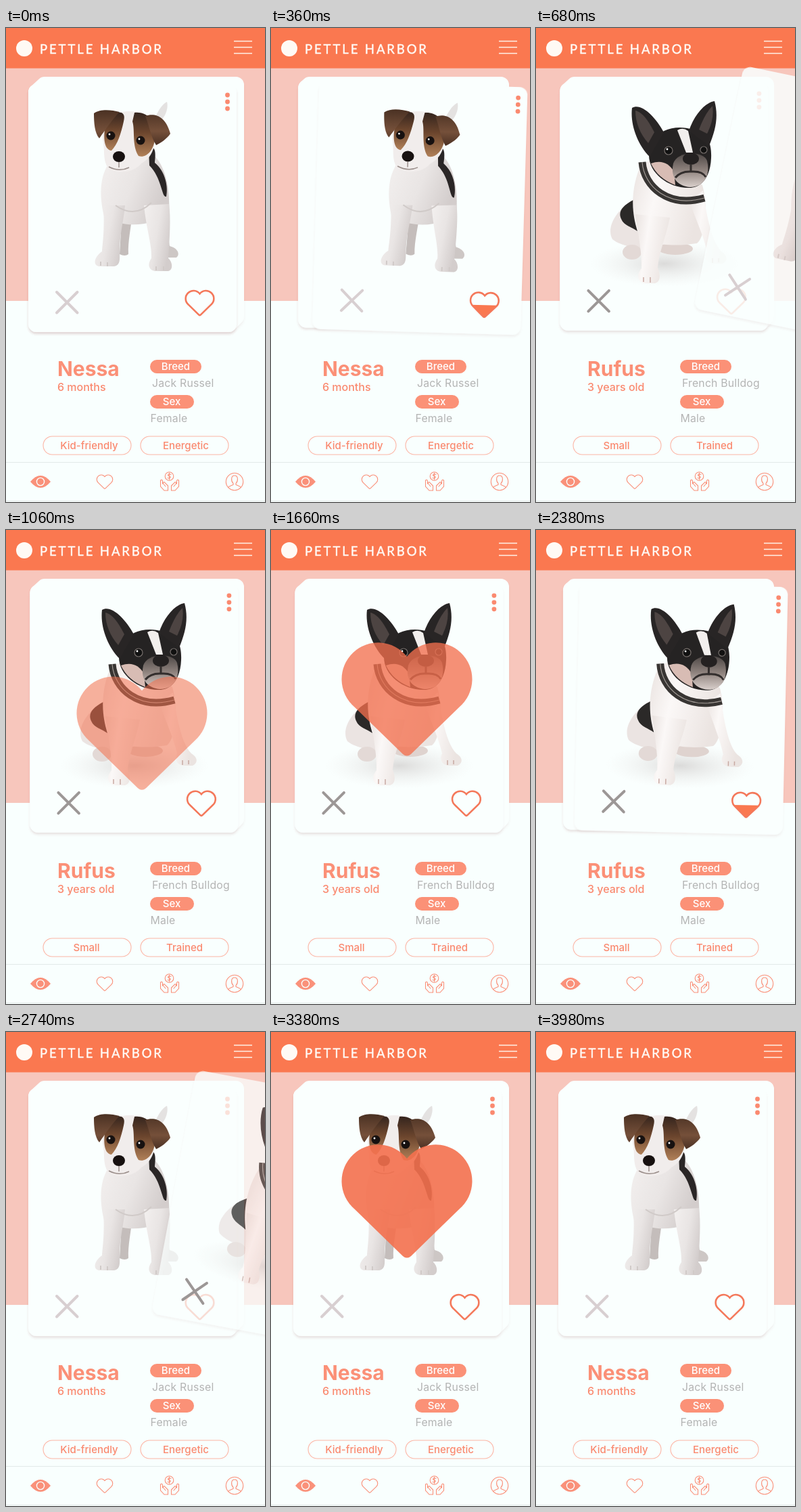
Animation, 383 px wide and 700 px high, one loop 4180 ms. Source, as an HTML page:

```html
<!DOCTYPE html>
<html lang="en">
<head>
<meta charset="utf-8">
<title>Pet cards</title>
<style>
html, body { margin: 0; height: 100%; overflow: hidden; background: #f9fffe; }
svg { display: block; width: 383px; height: 700px; font-family: Inter, "Open Sans", sans-serif; }
.title { font: 18.5px Lato, sans-serif; letter-spacing: 2.9px; fill: #fffaf5; stroke: #fffaf5; stroke-width: .45; }
.name { font-size: 30px; font-weight: 700; fill: #fb9077; }
.age { font-size: 16px; font-weight: 500; fill: #fa896f; }
.tag { font-size: 15px; font-weight: 500; fill: #fa896f; text-anchor: middle; }
.tag.pill { fill: #fff; }
.fact { font-size: 15.8px; letter-spacing: .2px; fill: #b4b4b4; }
.line { fill: none; stroke: #fa8f78; stroke-width: 1.1; stroke-linecap: round; }
.line.frame { stroke: #fcb5a5; }
</style>
</head>
<body>
<svg viewBox="0 0 383 700">
  <defs>
    <path id="heart" d="M0-65A54 54 0 1 0-78 9L-6 79Q0 84 6 79L78 9A54 54 0 1 0 0-65Z"/>
    <clipPath id="inHeart"><use href="#heart"/></clipPath>
    <linearGradient id="fur" x2="1" y2=".4">
      <stop stop-color="#f3f0ef"/><stop offset=".55" stop-color="#e9e5e4"/><stop offset="1" stop-color="#d3cdcc"/>
    </linearGradient>
    <linearGradient id="coat" x2="1" y2=".3">
      <stop stop-color="#e9e2df"/><stop offset=".4" stop-color="#fbf8f7"/><stop offset="1" stop-color="#ebe4e1"/>
    </linearGradient>
    <linearGradient id="tan" x2="0" y2="1">
      <stop stop-color="#35251e"/><stop offset=".45" stop-color="#6b452d"/><stop offset="1" stop-color="#b08058"/>
    </linearGradient>
    <linearGradient id="ear" x2="0" y2="1">
      <stop stop-color="#4a3123"/><stop offset=".6" stop-color="#75503a"/><stop offset="1" stop-color="#4a3023"/>
    </linearGradient>
    <linearGradient id="muzzle" x2="0" y2="1">
      <stop stop-color="#4d4745"/><stop offset=".5" stop-color="#8f837e"/><stop offset="1" stop-color="#d9cfcb"/>
    </linearGradient>
    <radialGradient id="ground">
      <stop stop-color="#b5aead" stop-opacity=".45"/><stop offset="1" stop-color="#e2dcdb" stop-opacity="0"/>
    </radialGradient>
    <filter id="soft" x="-10%" y="-10%" width="120%" height="120%">
      <feDropShadow dx="0" dy="3" stdDeviation="1.5" flood-color="#a06a68" flood-opacity=".09"/>
    </filter>

    <g id="terrier">
      <path fill="#e4e2e1" d="M214 136C224 133 224 117 238 109C241 120 234 136 222 142Z"/>
      <path fill="#cdc7c5" d="M222 270C240 285 240 310 242 322C254 325 258 334 252 339H236L226 300Z"/>
      <path fill="#c4bdbb" d="M170 265L187 272C185 295 180 315 181 334Q176 338 168 334L170 300Z"/>
      <path fill="url(#fur)" d="M152 200C138 220 138 250 145 278C170 296 215 294 241 274C243 240 236 200 215 185Z"/>
      <path fill="#2a2626" d="M211 178C223 171 221 190 220 199C236 212 240 235 237 249C230 251 231 222 212 203Z"/>
      <path fill="url(#fur)" d="M144 262C146 300 143 315 142 330C130 338 128 351 138 352H160C170 350 168 340 168 330C168 305 174 285 176 262Z"/>
      <path fill="url(#fur)" d="M204 262C208 300 216 320 215 340C208 350 212 359 222 359H240C248 357 246 345 240 340C242 310 244 280 241 260Z"/>
      <path fill="none" stroke="#d0cac8" stroke-width="2" d="M162 262Q190 282 215 258M140 345V351M150 346V352M222 352V358M233 352V358"/>
      <path fill="#f1edec" d="M160 128C180 118 210 124 218 140C224 165 220 190 200 200C190 213 165 217 152 208C142 195 147 180 143 165C142 148 148 136 160 128Z"/>
      <path fill="url(#tan)" d="M158 126C172 122 177 126 174 138C170 156 165 172 156 181C146 180 144 165 146 150Z"/>
      <path fill="url(#tan)" d="M190 125C212 123 222 140 220 165C218 182 206 193 196 189C186 174 191 150 187 138Z"/>
      <path fill="url(#ear)" d="M130 126C140 119 156 121 168 124C158 134 150 146 138 163C131 155 130 140 130 126ZM206 130C220 125 236 130 243 156C238 164 228 170 222 173C214 160 212 145 206 130Z"/>
      <g fill="#171110"><circle cx="155" cy="159" r="6.5"/><circle cx="199" cy="166" r="6.5"/><ellipse cx="167" cy="190" rx="9" ry="8"/></g>
      <path fill="none" stroke="#9a8e8a" stroke-width="1.5" d="M152 205Q168 213 182 206M167 198V206"/>
      <g fill="#fff"><circle cx="153" cy="157" r="1.4"/><circle cx="197" cy="164" r="1.4"/></g>
    </g>

    <g id="bulldog">
      <ellipse cx="190" cy="348" rx="110" ry="34" fill="url(#ground)"/>
      <path fill="#ebe4e2" d="M146 252C116 270 104 296 113 312C128 324 150 322 160 332V270Z"/>
      <path fill="#2b2928" d="M146 253C127 262 121 272 126 282C130 292 142 294 150 300Z"/>
      <ellipse cx="142" cy="331" rx="14" ry="11" fill="#e3d9d6"/>
      <ellipse cx="206" cy="326" rx="26" ry="9" fill="#dfd3cf"/>
      <path fill="url(#coat)" d="M156 200C138 240 142 275 150 300C160 320 200 324 238 318C252 306 254 260 246 232L190 190Z"/>
      <path fill="url(#coat)" d="M147 275C152 310 157 335 156 355C148 364 150 376 162 377H176C186 374 183 362 180 354C182 330 192 310 198 280Z"/>
      <path fill="url(#coat)" d="M226 255C240 290 250 315 253 330C248 342 255 348 265 348H276C284 344 284 336 274 330C262 318 254 290 247 240Z"/>
      <path fill="none" stroke="#c8a9a2" stroke-width="1.5" d="M159 368V375M169 368V376M261 340V347M270 340V346"/>
      <path fill="none" stroke="#383533" stroke-width="11" d="M157 198C160 235 196 266 249 251"/>
      <path fill="none" stroke="#a29b96" stroke-width="1.2" d="M157 198C160 235 196 266 249 251"/>
      <path fill="#252323" d="M174 166C184 148 210 143 232 150C254 152 260 172 259 192C258 218 246 237 225 236C195 236 167 214 167 188Z"/>
      <path fill="#282525" d="M142 118C155 110 176 130 189 154L168 190C150 172 139 142 142 118ZM226 152C234 128 250 110 264 108C270 130 266 150 256 174Z"/>
      <path fill="#4d4442" d="M147 122C158 124 168 140 175 154L166 170C154 156 147 140 147 122ZM241 150Q250 126 261 115Q264 135 253 156Z"/>
      <path fill="#f2efed" d="M209 151Q217 146 225 152L232 184H222Z"/>
      <path fill="#d8bcb4" d="M170 200Q192 192 204 212L206 232Q180 222 170 200Z"/>
      <path fill="url(#muzzle)" d="M203 200C208 182 247 180 253 196C258 215 250 235 228 235C206 233 199 218 203 200Z"/>
      <ellipse cx="229" cy="193" rx="12" ry="9" fill="#242121"/>
      <path fill="none" stroke="#332e2d" stroke-width="3" d="M206 221Q214 211 230 212Q246 211 251 220M229 201V211"/>
      <g fill="#111" stroke="#77706d" stroke-width="1.2"><circle cx="196" cy="181" r="6"/><circle cx="248" cy="180" r="5"/></g>
      <circle cx="194" cy="179" r="1.4" fill="#fff"/>
    </g>
  </defs>

  <rect width="383" height="700" fill="#f9fffe"/>
  <rect y="59" width="383" height="344" fill="#f7c6bc"/>
  <rect width="383" height="59.5" fill="#fa7850"/>
  <circle cx="27" cy="30" r="12" fill="#fffaf5"/>
  <text class="title" x="50" y="38">PETTLE HARBOR</text>
  <path d="M337 19.5H364M337 28.5H364M337 37.5H364" stroke="#fff1e8" stroke-width="1.6"/>

  <rect x="213" y="490" width="76" height="20" rx="10" fill="#fb9177"/>
  <rect x="213" y="542" width="65" height="20" rx="10" fill="#fb9177"/>
  <text class="tag pill" x="251" y="505">Breed</text>
  <text class="tag pill" x="245" y="557">Sex</text>
  <rect class="line frame" x="55" y="603" width="130" height="27" rx="13.5"/>
  <rect class="line frame" x="199" y="603" width="130" height="27" rx="13.5"/>
  <g id="info"></g>

  <path d="M0 641.5H383M0 698.5H383" stroke="#e3eae9"/>
  <path d="M36 670Q51 652 66 670Q51 688 36 670Z" fill="#fa917a"/>
  <circle cx="51" cy="670" r="5.6" fill="#fa917a" stroke="#f9fffe" stroke-width="1.4"/>
  <use href="#heart" transform="translate(146 670.5) scale(.122)" fill="none" stroke="#fa8f78" stroke-width="9"/>
  <g class="line">
    <circle cx="241.5" cy="662" r="6.3"/>
    <path d="M244 659.5Q240 657.5 239.5 660.5Q241 662 243 662.5Q244 665.5 239 664.5M241.5 657V667"/>
    <path id="hand" d="M228.5 668V677L234 683H239.5V676L234 670.5Q231.5 671 233 673.5L236 677M228.5 668Q231 666 231.5 669V673"/>
    <use href="#hand" transform="matrix(-1 0 0 1 484 0)"/>
    <circle cx="338" cy="670" r="12.7"/>
    <path d="M338 661C332 661 333 670 336 672.5V674.5C333 676 330 676 328.5 678.5M338 661C344 661 343 670 340 672.5V674.5C343 676 346 676 347.5 678.5"/>
  </g>

  <path id="stack" fill="#fafffe" stroke="#fafffe" stroke-width="24" stroke-linejoin="round" filter="url(#soft)"/>
  <g id="deck"></g>
  <use id="like" href="#heart" fill="#f4704e"/>
</svg>
<script>
const LOOP = 4180;
const $ = id => document.getElementById(id);
const clamp = v => Math.min(1, Math.max(0, v));
const mix = (a, b, p) => a + (b - a) * p;
const ramp = (t, a, b) => clamp((t - a) / (b - a));

// depth: how far along the stack a card rests, 0 front to 1 back
const pets = [
  { art: "terrier", cross: "#d8cfd1", depth: 0, name: "Nessa", age: "6 months",
    breed: "Jack Russel", sex: "Female", tags: [["Kid-friendly", 123], ["Energetic", 266]] },
  { art: "bulldog", cross: "#9c9796", depth: .2, name: "Rufus", age: "3 years old",
    breed: "French Bulldog", sex: "Male", tags: [["Small", 119], ["Trained", 264]] }
];

function group(parent, html) {
  const g = document.createElementNS("http://www.w3.org/2000/svg", "g");
  g.innerHTML = html;
  parent.append(g);
  return g;
}

for (const p of pets) {
  p.info = group($("info"), `
    <text class="name" x="76" y="514">${p.name}</text>
    <text class="age" x="76" y="536">${p.age}</text>
    <text class="fact" x="216" y="530">${p.breed}</text>
    <text class="fact" x="213.5" y="582">${p.sex}</text>` +
    p.tags.map(([s, x]) => `<text class="tag" x="${x}" y="622">${s}</text>`).join(""));
  // artwork is laid out at the card's resting depth
  p.card = group($("deck"), `
    <g class="face">
      <rect x="33" y="83" width="308" height="366" rx="12" fill="#fafffe" filter="url(#soft)"/>
      <use href="#${p.art}" transform="translate(${-12 * p.depth} ${11 * p.depth})"/>
      <g fill="#fa8a70"><circle cx="327.5" cy="99" r="3.4"/><circle cx="327.5" cy="109" r="3.4"/><circle cx="327.5" cy="119" r="3.4"/></g>
      <g transform="translate(286.5 406.5) scale(.216)">
        <g clip-path="url(#inHeart)"><rect class="level" x="-95" width="190" height="170" fill="#fa7850"/></g>
        <use href="#heart" fill="none" stroke="#f4785a" stroke-width="12"/>
      </g>
    </g>
    <path class="cross" d="M75 390L105.5 420.5M105.5 390L75 420.5" stroke="${p.cross}" stroke-width="4" stroke-linecap="round"/>`);
  for (const part of ["face", "level", "cross"]) p[part] = p.card.querySelector("." + part);
}

function place(p, depth, slide, alpha, level) {
  p.card.setAttribute("transform",
    `translate(${12 * depth + slide} ${-11 * depth}) rotate(${slide / 20} 187 266)`);
  p.face.setAttribute("opacity", alpha);
  p.cross.setAttribute("opacity", Math.min(1, alpha * 1.6));
  p.level.setAttribute("y", 84 - 168 * level);
}

function drawStack(depth) {
  const x = 45 + 12 * depth, y = 95 - 11 * depth;
  $("stack").setAttribute("d",
    `M${x} ${y}L57 84H340V426L${x + 284} ${y + 342}H${x}Z`);
}

function drawLike(t) {
  const [a, b, c, d] = t < 2000 ? [940, 1260, 1540, 1860] : [3060, 3380, 3780, 3980];
  const rise = 1 - (1 - ramp(t, a, b)) ** 2;
  $("like").setAttribute("transform", `translate(201 ${252 + 130 * (1 - rise)})`);
  $("like").setAttribute("opacity", .9 * rise * (1 - ramp(t, c, d) ** 2));
}

function draw(t) {
  const first = t < 2060;
  const [top, next] = first ? pets : [pets[1], pets[0]];
  const e = Math.max(0, t - (first ? 40 : 2060));
  const slide = Math.min(600, (first ? 33 : 25) * (e / 320) ** 2.82);
  const p = ramp(e, 0, 640);
  const depth = mix(top.depth, next.depth, p) + .5 * Math.sin(Math.PI * p);

  if ($("deck").lastChild !== top.card) $("deck").append(top.card);
  place(next, depth, 0, 1, 0);
  place(top, top.depth, slide, 1 - ramp(e, 520, 840) ** 2, ramp(e, 120, 520));
  drawStack(depth);

  const swap = ramp(e, 460, 620);
  top.info.setAttribute("opacity", 1 - swap);
  next.info.setAttribute("opacity", swap);
  drawLike(t);
}

function tick() {
  draw(performance.now() % LOOP);
  requestAnimationFrame(tick);
}
tick();
</script>
</body>
</html>
```
